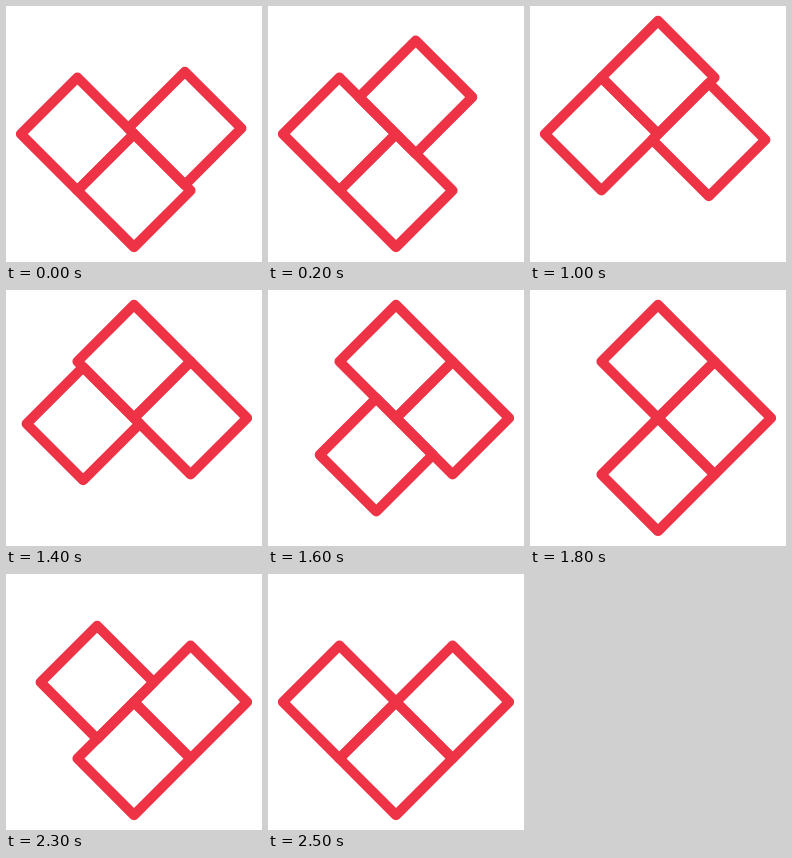
An HTML page with a canvas that plays this animation: 256x256 px, repeating every 2.8 s.

```html
<!DOCTYPE html>
<html lang="en">
<head>
<meta charset="utf-8">
<title>Sliding squares</title>
<style>
  html, body { margin: 0; width: 100%; height: 100%; overflow: hidden; background: #fff; }
  canvas { display: block; width: 256px; height: 256px; }
</style>
</head>
<body>
<canvas id="stage" width="256" height="256"></canvas>
<script>
const ctx = document.getElementById('stage').getContext('2d');
const MID = 128;
const REACH = 80 / Math.SQRT2;  // half diagonal of a square with side 80
const STEP = 100;               // the motion advances in 100 ms steps
const TURN = 700;               // one square slides per turn
const SLIDE = 510;              // length of a slide
const LEAD = 105;               // part of the slide that precedes its turn

// Slots clockwise from the top; one is always free.
const slots = [[0, -1], [1, 0], [0, 1], [-1, 0]]
  .map(([x, y]) => [MID + x * REACH, MID + y * REACH]);

const ease = x => (1 - Math.cos(Math.PI * Math.min(1, Math.max(0, x)))) / 2;

function square(x, y) {
  ctx.beginPath();
  ctx.moveTo(x, y - REACH);
  ctx.lineTo(x + REACH, y);
  ctx.lineTo(x, y + REACH);
  ctx.lineTo(x - REACH, y);
  ctx.closePath();
  ctx.stroke();
}

function draw(ms) {
  const t = Math.floor((ms % (4 * TURN)) / STEP) * STEP;
  const free = Math.floor(t / TURN);
  const mover = (free + 1) % 4;
  const p = ease((t % TURN + LEAD) / SLIDE);

  ctx.fillStyle = '#fff';
  ctx.fillRect(0, 0, 256, 256);
  ctx.strokeStyle = '#ef3346';
  ctx.lineWidth = 10;
  ctx.lineJoin = 'round';

  slots.forEach(([x, y], i) => {
    if (i === free) return;
    const [toX, toY] = slots[i === mover ? free : i];
    square(x + (toX - x) * p, y + (toY - y) * p);
  });
}

const start = performance.now();
function tick() {
  draw(performance.now() - start);
  requestAnimationFrame(tick);
}
tick();
</script>
</body>
</html>
```
